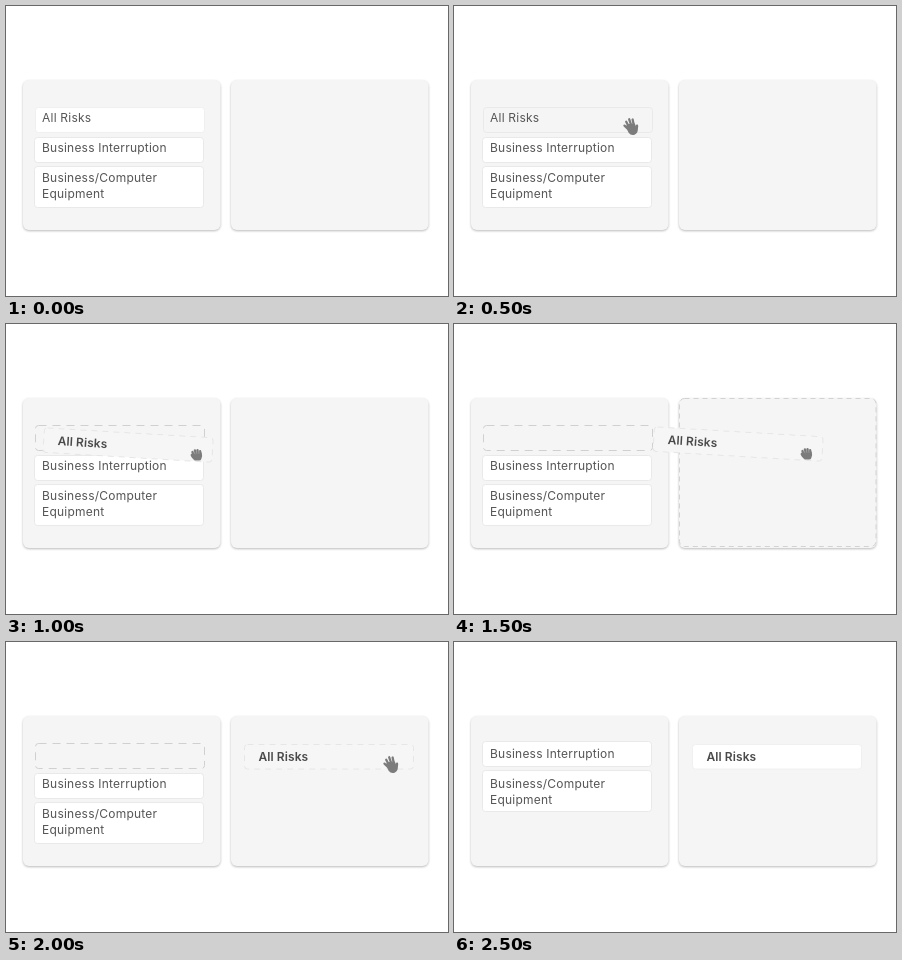
Animation, 442 px wide and 290 px high, one loop 3000 ms. Source, as an HTML page:

```html
<!DOCTYPE html>
<html lang="en">
<head>
<meta charset="utf-8">
<title>Drag and drop</title>
<style>
  html, body { margin: 0; width: 100%; height: 100%; overflow: hidden; background: #fff; }
  svg { display: block; width: 442px; height: 290px; }
  text { font: 12px Inter, sans-serif; letter-spacing: .22px; fill: #555; }
  .bold { font-weight: 600; letter-spacing: .08px; fill: #4a4a4a; }
  .panel { fill: #f5f5f5; filter: drop-shadow(0 1.7px 1px rgba(0, 0, 0, .27)); }
  .card { fill: #fff; stroke: #e9e9e9; }
  .soft { stroke: #f0f0f0; }
  .held { fill: #f5f5f5; }
  .ghost { fill: #f6f6f6; stroke: #e6e6e6; stroke-dasharray: 6 5; }
  .slot { fill: none; stroke: #d0d0d0; stroke-dasharray: 8 6; }
  .zone { fill: none; stroke: #d2d2d2; stroke-dasharray: 5 4; }
  .hand { fill: #7c7c7c; stroke: #7c7c7c; stroke-linecap: round; stroke-linejoin: round; }
</style>
</head>
<body>
<svg id="stage" viewBox="0 0 442 290"></svg>
<script>
const STEP = 500;
const stage = document.getElementById('stage');

const box = (cls, x, y, w, h, r = 3) =>
  `<rect class="${cls}" x="${x}" y="${y}" width="${w}" height="${h}" rx="${r}"/>`;
const label = (x, y, str, cls = '') => `<text class="${cls}" x="${x}" y="${y}">${str}</text>`;
const at = (x, y, body, turn = 0) =>
  `<g transform="translate(${x} ${y}) rotate(${turn})">${body}</g>`;

const panels = box('panel', 17, 74, 197.5, 150, 6) + box('panel', 225, 74, 197.5, 150, 6);
const slot = box('slot', 29.5, 101.5, 169, 25);
const zone = box('zone', 225.5, 74.5, 196.5, 148, 5);

const first = cls => box(cls, 29.5, 101.5, 169, 25) + label(36, 116, 'All Risks');

// Cards and their labels settle at slightly different heights.
const list = (cardY, textY) =>
  box('card', 28.5, cardY, 169, 25) + box('card', 28.5, cardY + 29, 169, 41) +
  label(36, textY, 'Business Interruption') +
  label(36, textY + 30, 'Business/Computer') + label(36, textY + 46, 'Equipment');
const waiting = list(131.5, 146);

const item = (cls, x, y, turn) => at(x, y,
  box(cls, 0, 0, 169, 24.5) + label(14, 16.5, 'All Risks', 'bold'), turn);

const openHand = (x, y) => at(x, y, `<g class="hand">
  <path stroke="none" d="M2.6 9L6 7L11.8 6.5L13 9.5Q13.6 7.2 14.8 8Q15.6 9 14.9 11.5Q15 16.5 11.5 17.7Q8 18.8 5.6 15.8Z"/>
  <path fill="none" stroke-width="2.3" d="M6 13L1.5 8.6M6.5 11L3.2 4.7M8.5 9L6.2 2.3M11 9L9.6 2.5M13.2 12L14 8.7"/>
</g>`);

const fist = (x, y) => at(x, y, `<g class="hand">
  <path stroke="none" d="M1 5L11 4Q12.3 7 10.8 10.5Q10.4 12 8.5 12H4.2Q2.8 11 1.4 8.6Z"/>
  <path fill="none" stroke-width="2.4" d="M3 6L2 3.5M5 5L4.4 1.8M7.3 5L7 1.6M10 6L9.6 2.7M2.5 8.5L1.3 6.5"/>
  <path fill="none" stroke="#b5b5b5" stroke-width=".5" d="M3.5 3.2L4.3 5.3M5.9 2.4L6.3 4.8M8.4 2.6L8.5 4.9"/>
</g>`);

const drag = (x, y) => item('ghost', x, y, 3.4) + fist(x + 146, y + 20.8);

const poses = [
  first('card soft') + waiting,
  first('card held') + waiting + openHand(169, 111),
  slot + waiting + drag(38.5, 103.8),
  slot + waiting + zone + drag(200.5, 102.8),
  slot + waiting + item('ghost', 238.5, 102.5) + openHand(377, 113),
  list(99.5, 116) + item('card soft', 238.5, 102.5)
];

let shown = -1;
function draw(now) {
  const i = Math.floor(now / STEP) % poses.length;
  if (i === shown) return;
  stage.innerHTML = panels + poses[i];
  shown = i;
}

const start = performance.now();
function tick() {
  draw(performance.now() - start);
  requestAnimationFrame(tick);
}
draw(0);
requestAnimationFrame(tick);
</script>
</body>
</html>
```
